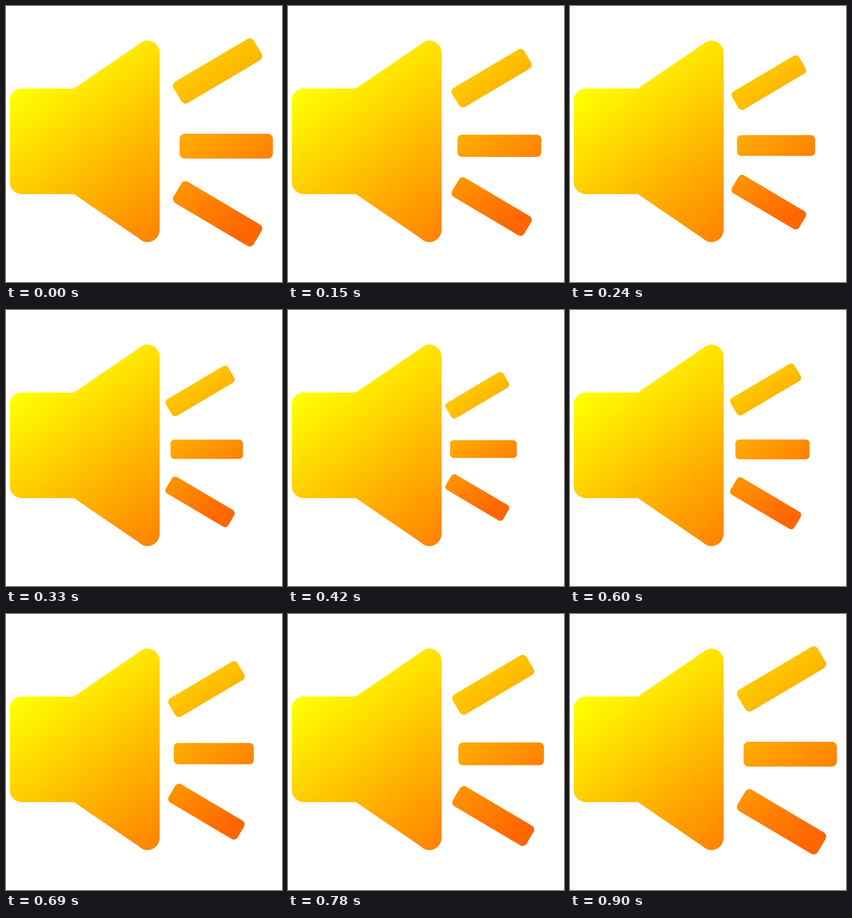
Animation, 512 px wide and 512 px high, one loop 970 ms. Source, as an HTML page with a canvas:

```html
<!DOCTYPE html>
<html lang="en">
<head>
<meta charset="utf-8">
<title>Speaker</title>
<style>
  html, body { margin: 0; width: 100%; height: 100%; overflow: hidden; background: #fff; }
  canvas { display: block; width: 512px; height: 512px; }
</style>
</head>
<body>
<canvas id="stage" width="512" height="512"></canvas>
<script>
const ctx = document.getElementById('stage').getContext('2d');

const LOOP = 970, STEP = 30, STEPS = 30;
const MIN_SCALE = 0.695;
const PIVOT = { x: 247, y: 253 };

const fill = ctx.createLinearGradient(30, 152, 306, 520);
fill.addColorStop(0, '#ffff00');
fill.addColorStop(1, '#ff6600');

const speaker = new Path2D(
  'M29 153H126L247 70.5A23 23 0 0 1 262 64A23 23 0 0 1 285 87' +
  'V415A23 23 0 0 1 262 438A23 23 0 0 1 247 431.5L126 349' +
  'H29A22 22 0 0 1 7 327V175A22 22 0 0 1 29 153Z');

// Rounded bar placed by its centre and tilt
function bar(x, y, deg) {
  const shape = new Path2D(), placed = new Path2D();
  shape.roundRect(-86.5, -23, 173, 46, 9);
  placed.addPath(shape, new DOMMatrix().translate(x, y).rotate(deg));
  return placed;
}

const bars = [
  bar(392.5, 120.5, -30.6),
  bar(408.5, 260, 0),
  bar(392.5, 385.5, 30.6)
];

// Linear shrink and regrow in even steps, then a short hold
function scaleAt(time) {
  const step = Math.min(STEPS, Math.floor((time % LOOP) / STEP));
  const half = STEPS / 2;
  return MIN_SCALE + (1 - MIN_SCALE) * Math.abs(step - half) / half;
}

function draw(time) {
  const s = scaleAt(time);
  ctx.fillStyle = '#fff';
  ctx.fillRect(0, 0, 512, 512);
  ctx.fillStyle = fill;
  ctx.fill(speaker);
  ctx.save();
  ctx.translate(PIVOT.x, PIVOT.y);
  ctx.scale(s, s);
  ctx.translate(-PIVOT.x, -PIVOT.y);
  bars.forEach(b => ctx.fill(b));
  ctx.restore();
}

const start = performance.now();
function tick() {
  draw(Math.max(0, performance.now() - start));
  requestAnimationFrame(tick);
}
tick();
</script>
</body>
</html>
```
